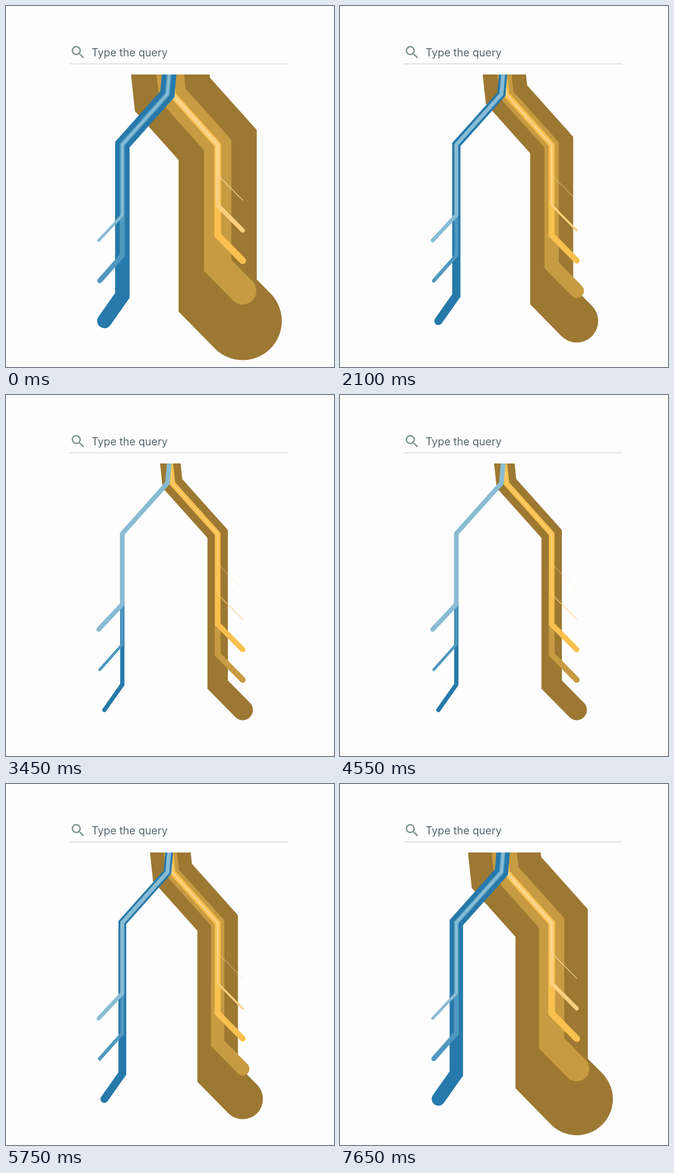
An HTML page for the animation above (7.7 s loop, 600x659 px).

```html
<!DOCTYPE html>
<html lang="en">
<head>
<meta charset="utf-8">
<title>Query flow</title>
<style>
html, body { margin: 0; height: 100%; overflow: hidden; background: #fefdfe; }
svg { display: block; width: 100vw; height: 100vh; }
text { font: 400 19.5px Inter, "Open Sans", sans-serif; fill: #56656a; }
#flows { fill: none; stroke-linecap: round; stroke-miterlimit: 10; }
</style>
</head>
<body>
<svg viewBox="0 0 600 659">
  <clipPath id="below"><rect y="125" width="600" height="534"/></clipPath>
  <path fill="#7f968b" transform="translate(116.3 69.1) scale(1.29)"
    d="M15.5 14h-.79l-.28-.27A6.5 6.5 0 1 0 13.73 14.43l.27.28v.79l5 4.99L20.49 19zM9.5 14a4.5 4.5 0 1 1 0-9 4.5 4.5 0 0 1 0 9z"/>
  <text x="156.5" y="92">Type the query</text>
  <rect x="116.5" y="105" width="399.5" height="1.2" fill="#cfced2"/>
  <g id="flows" clip-path="url(#below)"></g>
</svg>
<script>
const LOOP = 7700, SWING = 4000, STEP = 50;
const layer = document.getElementById("flows");
const flows = [];

// Each flow is a trunk that bends off at bendY to its end; its width swings between wide and narrow.
function addFlow(trunk, trunkX, bendY, endX, endY, color, wide, narrow) {
  const path = document.createElementNS("http://www.w3.org/2000/svg", "path");
  path.setAttribute("d", `M${trunk} L${trunkX} ${bendY} L${endX} ${endY}`);
  path.setAttribute("stroke", color);
  layer.append(path);
  flows.push({ path, wide, narrow });
}

const goldTrunk = "293.7 60 L304.5 161.5 L387.2 253.7";
[
  ["#9c7832", 143, 20.5],
  ["#c79b41", 50, 4.6],
  ["#fac04e", 12.5, 9.4],
  ["#fad07e", 8, 0.1],
  ["#fde0a6", 1.2, 0.6]
].forEach(([color, wide, narrow], i) =>
  addFlow(goldTrunk, 387.2, 528.5 - 55 * i, 433, 575 - 55.1 * i, color, wide, narrow));

const blueTrunk = "304.3 60 L295.2 161 L212.8 253";
[
  [180, "#2679aa", 26.5, 4.8],
  [171.5, "#4f98bf", 9.2, 4.2],
  [169.5, "#89bcd3", 5, 9]
].forEach(([endX, color, wide, narrow], i) =>
  addFlow(blueTrunk, 212.8, 528.5 - 73.3 * i, endX, 575 - 73.5 * i, color, wide, narrow));

function draw(now) {
  const t = Math.floor(now % LOOP / STEP) * STEP;
  const open = Math.abs(t - SWING) / SWING;
  for (const { path, wide, narrow } of flows)
    path.setAttribute("stroke-width", narrow + (wide - narrow) * open);
}

const start = performance.now();
function tick() {
  draw(performance.now() - start);
  requestAnimationFrame(tick);
}
tick();
</script>
</body>
</html>
```
